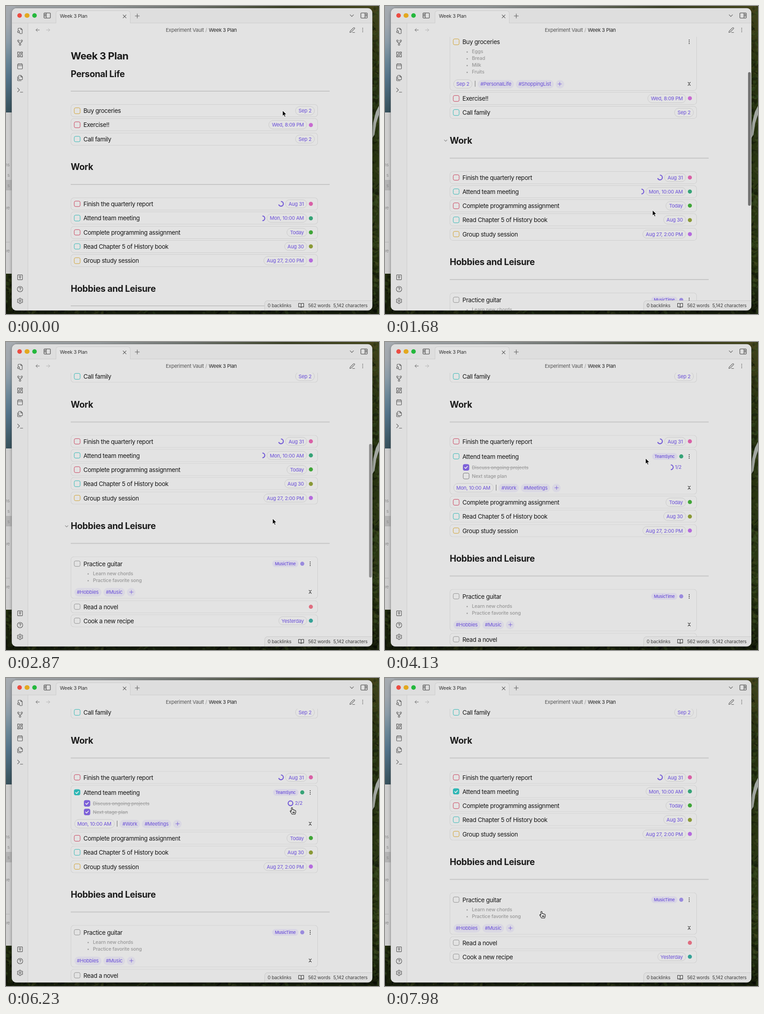
An HTML page with a canvas that plays this animation: 824x680 px, repeating every 8 s.

```html
<!DOCTYPE html>
<html lang="en">
<head>
<meta charset="utf-8">
<title>Week 3 Plan</title>
<style>
html, body { margin: 0; width: 100%; height: 100%; overflow: hidden; }
body { background: #14180d; font: 11px/1 Inter, sans-serif; letter-spacing: -.022em; color: #1b1b1b; }
#stage { position: relative; width: 824px; height: 680px; overflow: hidden; }
#stage *, #stage { box-sizing: border-box; }
.abs, .icon, .t { position: absolute; }
.t { transform: translateY(-50%); white-space: pre; line-height: 16px; }
.icon { transform: translate(-50%, -50%); }
svg { display: block; overflow: visible; fill: none; stroke: #5a5a5a; stroke-width: 1.9; stroke-linecap: round; stroke-linejoin: round; }

#scene { left: 0; top: 0; }
.behind { left: 0; top: 235px; width: 20px; height: 356px; background: #cecece; color: #8d8d8d; font-size: 10px; }
.behind i { left: 0; top: 149px; width: 20px; height: 23px; background: #b4b4b4; }

#win { left: 13px; top: 5px; width: 796px; height: 667px; border-radius: 10px; background: #e3e3e3; box-shadow: 0 0 0 .5px #8c8c8c, 0 2px 7px #0005; overflow: hidden; }
#win > div { left: -13px; top: -5px; width: 824px; height: 680px; }
.bar { left: 13px; top: 5px; width: 796px; height: 33px; background: #dedede; border-bottom: 1px solid #cdcdcd; }
.side { left: 13px; top: 38px; width: 36px; height: 634px; background: #dfdfdf; border-right: 1px solid #cdcdcd; }
.tab { left: 110px; top: 10px; width: 165px; height: 28px; background: #e3e3e3; border: 1px solid #cdcdcd; border-bottom: 0; border-radius: 6px 6px 0 0; }
.light { width: 10.4px; height: 10.4px; border-radius: 50%; top: 16px; }

#view { left: 49px; top: 68px; width: 760px; height: 604px; overflow: hidden; }
#doc { left: 94px; top: 0; width: 572px; padding-top: 34px; }
h1, h2 { margin: 0; white-space: nowrap; }
h1 { position: absolute; top: 21.5px; font-size: 22.2px; line-height: 40px; letter-spacing: -.024em; }
h2 { position: relative; padding-top: 27.6px; height: 87.2px; font-size: 19.5px; line-height: 40px; font-weight: 650; letter-spacing: -.017em; border-bottom: 2px solid #c6c6c6; margin-bottom: 28px; }
h2 .icon { left: -9px; top: 48px; opacity: 0; }
.card { --e: 0; position: relative; width: 546px; height: calc(28px + var(--e) * var(--g)); margin-bottom: 3.3px; border-radius: 7px; box-shadow: inset 0 0 0 1px #cfcfcf; overflow: hidden; }
.card:last-child { margin-bottom: 0; }
.head { left: 0; right: 0; top: calc(14px + 1.9px * var(--e)); height: 0; }
.title { left: 28px; font-size: 13.35px; letter-spacing: -.027em; color: #161616; line-height: 20px; }
.box { position: absolute; width: 13.5px; height: 13.5px; border: 1.2px solid var(--c); border-radius: 3.5px; transform: translate(-50%, -50%); }
.box svg { position: absolute; left: -1.2px; top: -1.2px; width: 13.5px; height: 13.5px; stroke: #ececec; stroke-width: 3; opacity: var(--on, 0); background: var(--c); border-radius: 3.5px; }
.row { position: absolute; display: flex; align-items: center; gap: 4px; transform: translateY(-50%); white-space: nowrap; color: #6a4fd8; }
.closed { opacity: calc(1 - var(--e)); }
.open { opacity: var(--e); }
.pill, .tag { height: 19.5px; line-height: 18px; border-radius: 10px; padding: 0 6px; border: 1px solid #c9c9c9; }
.tag { border-color: transparent; background: #dad8e3; padding: 0 5px; height: 19px; line-height: 17px; }
.plus { width: 19px; padding: 0; display: grid; place-items: center; }
.proj { height: 15px; line-height: 15px; border-radius: 8px; padding: 0 5.5px; background: #d9d6e5; font-size: 9.3px; font-weight: 500; }
.dot { width: 9px; height: 9px; border-radius: 50%; }
.ring { width: 13px; height: 13px; stroke: #7259d6; stroke-width: 2.2; stroke-linecap: butt; transform: rotate(-90deg); margin-right: -1px; flex: none; }
.sep { color: #555; }
.note { left: 49px; font-size: 10.6px; font-weight: 450; letter-spacing: -.012em; color: #979797; }
.note.bullet::before { content: ""; position: absolute; left: -12px; top: 7px; width: 3px; height: 3px; border-radius: 50%; background: #a0a0a0; }
.done { text-decoration: line-through; color: #a3a3a3; }

#thumb { left: 802px; width: 5.5px; height: 295px; border-radius: 3px; background: #757575; }
.status { left: 571px; top: 650px; width: 238px; height: 22px; background: #dfdfdf; border: 1px solid #cbcbcb; border-width: 1px 0 0 1px; border-radius: 7px 0 0; }
.st { font-size: 10.2px; letter-spacing: -.02em; color: #3f3f3f; }
#press { width: 34px; height: 34px; margin: -17px 0 0 -17px; border-radius: 50%; border: 2px solid #a6a6a6; background: #ededed66; left: 0; top: 0; }
#cursor { left: 0; top: 0; }
#cursor svg { position: absolute; stroke: #fff; stroke-width: 1; fill: #000; transform: scale(.88); transform-origin: 0 0; }
#cursor .hand { fill: #f4f4f4; stroke: #111; stroke-width: 1.1; transform: none; }
</style>
</head>
<body>
<div id="stage">
  <canvas class="abs" id="scene" width="824" height="680"></canvas>
  <div class="abs behind" id="behind"><i class="abs"></i></div>
  <div class="abs" id="win"><div class="abs" id="ui">
    <div class="abs bar"></div><div class="abs side"></div><div class="abs tab"></div>
    <div class="abs" id="view"><div class="abs" id="doc"><h1>Week 3 Plan</h1></div></div>
    <div class="abs" id="thumb"></div>
    <div class="abs status"></div>
  </div></div>
  <div class="abs" id="press"></div>
  <div class="abs" id="cursor">
    <svg class="arrow" width="12" height="18"><path d="M0 0V13.6L3.1 10.8 5.2 15.8 7.6 14.8 5.5 9.9H9.8Z"/></svg>
    <svg class="hand" width="14" height="16"><path d="M-1.6 6.5V.6C-1.6-1.2 1-1.2 1 .6V4.4C1.6 3.6 3.4 3.8 3.5 5 4.2 4.3 5.8 4.6 5.9 5.7 6.8 5.2 8.1 5.7 8.1 7V9.4C8.1 11.4 7 12 6.8 14H-.3C-.6 12.4-3.3 9.6-4.2 7.6-4.6 6.4-3.1 5.6-2.3 6.9L-1.6 8M1.6 8.6V11.4M3.4 8.6V11.4M5.2 8.6V11.4"/></svg>
  </div>
</div>
<script>
const $ = s => document.querySelector(s);
const add = (el, html) => el.insertAdjacentHTML('beforeend', html);
const svg = (d, size, extra = '') => `<svg viewBox="0 0 24 24" width="${size}" height="${size}" style="${extra}"><path d="${d}"/></svg>`;
const icon = (x, y, d, size = 14.5, extra) => `<span class="icon" style="left:${x}px;top:${y}px">${svg(d, size, extra)}</span>`;
const text = (x, y, s, cls = '', css = '') => `<span class="t ${cls}" style="left:${x}px;top:${y}px;${css}">${s}</span>`;

// wooded wallpaper that shows around the window
function paintScene() {
  const g = $('#scene').getContext('2d');
  let seed = 7;
  const rnd = () => (seed = seed * 16807 % 2147483647) / 2147483647;
  const fade = (x0, y0, x1, y1, stops) => {
    const f = g.createLinearGradient(x0, y0, x1, y1);
    stops.forEach((c, i) => f.addColorStop(i / (stops.length - 1), c));
    return f;
  };
  const leaves = (n, x, y, w, h, dark) => {
    for (let i = 0; i < n; i++) {
      g.fillStyle = `hsl(${68 + 26 * rnd()} 40% ${dark + 17 * rnd()}% / .6)`;
      g.beginPath();
      g.ellipse(x + w * rnd(), y + h * rnd(), 1 + 2.5 * rnd(), 2 + 5 * rnd(), rnd() * 3, 0, 7);
      g.fill();
    }
  };
  g.fillStyle = fade(0, 0, 0, 680, ['#45441c', '#28320f', '#26310f', '#2b3812', '#27340f', '#141b0a']);
  g.fillRect(0, 0, 824, 680);
  leaves(420, 806, 0, 18, 640, 6);
  leaves(40, 806, 640, 18, 40, 2);
  leaves(180, 0, 668, 824, 12, 1);
  leaves(40, 0, 588, 15, 92, 2);
  g.fillStyle = '#a3a8a2';
  g.fill(new Path2D('M824 220 817 234 811 258 809 292 814 284 818 258 824 240Z'));
  g.fillStyle = fade(0, 0, 824, 0, ['#a2a7ab', '#94999b', '#6c716c', '#3a4023', '#454619']);
  g.fillRect(0, 0, 806, 8);
  g.fillStyle = fade(0, 0, 0, 236, ['#a6abb0', '#a0a7ae', '#8b9ca8', '#6c8898', '#54748a', '#456272', '#36505a']);
  g.fillRect(0, 0, 20, 236);
}
paintScene();

const P = {
  x: 'M5 5 19 19M19 5 5 19', plus: 'M12 4V20M4 12H20', down: 'M5 9 12 16 19 9', tick: 'M6.5 12.5 10.5 16.5 17.5 8.5',
  dots: 'M12 5V5.1M12 12V12.1M12 19V19.1', fold: 'M6 4 12 10 18 4M6 20 12 14 18 20',
  back: 'M20 12H4M11 5 4 12 11 19', next: 'M4 12H20M13 5 20 12 13 19',
  left: 'M4 4H20Q22 4 22 6V18Q22 20 20 20H4Q2 20 2 18V6Q2 4 4 4ZM9 4V20M4.5 8H6.5M4.5 11H6.5M4.5 14H6.5',
  right: 'M4 4H20Q22 4 22 6V18Q22 20 20 20H4Q2 20 2 18V6Q2 4 4 4ZM15 4V20M17.5 8H19.5M17.5 11H19.5M17.5 14H19.5',
  pen: 'M17 3A2.8 2.8 0 0 1 21 7L7.5 20.5 2 22 3.5 16.5ZM13 22H22',
  book: 'M2 4H8A4 4 0 0 1 12 8V21A3 3 0 0 0 9 18H2ZM22 4H16A4 4 0 0 0 12 8V21A3 3 0 0 1 15 18H22Z'
};
const rail = [
  [54.5, 'M5 9V4Q5 2 7 2H15L20 7V20Q20 22 18 22H12M15 2V7H20M10 15A3.5 3.5 0 1 0 3 15 3.5 3.5 0 1 0 10 15M9 18 12 21'],
  [80.5, 'M9 5A3 3 0 1 0 3 5 3 3 0 1 0 9 5M21 5A3 3 0 1 0 15 5 3 3 0 1 0 21 5M15 19A3 3 0 1 0 9 19 3 3 0 1 0 15 19M6 8V10Q6 12 8 12H16Q18 12 18 10V8M12 12V16'],
  [107, 'M3 3H10V12H3ZM14 3H21V8H14ZM14 12H21V21H14ZM3 16H10V21H3Z'],
  [133, 'M5 4H19Q21 4 21 6V20Q21 22 19 22H5Q3 22 3 20V6Q3 4 5 4ZM16 2V6M8 2V6M3 10H21'],
  [159, 'M15 2H9Q7 2 7 4V16Q7 18 9 18H19Q21 18 21 16V8ZM15 2V8H21M3 7V20Q3 22 5 22H16'],
  [185.5, 'M3 18 10 11 3 4M13 19H22'],
  [599, 'M5 3H19Q21 3 21 5V19Q21 21 19 21H5Q3 21 3 19V5Q3 3 5 3ZM15 10A3 3 0 1 0 9 10 3 3 0 1 0 15 10M12 13V17'],
  [625, 'M22 12A10 10 0 1 0 2 12 10 10 0 1 0 22 12M9 9A3 3 0 0 1 15 10C15 12 12 12.5 12 14M12 17.5V17.6'],
  [651, 'M15 12A3 3 0 1 0 9 12 3 3 0 1 0 15 12M10 2H14L14.7 5 17 6.3 20 5.4 22 8.8 19.8 11V13L22 15.2 20 18.6 17 17.7 14.7 19 14 22H10L9.3 19 7 17.7 4 18.6 2 15.2 4.2 13V11L2 8.8 4 5.4 7 6.3 9.3 5Z']
];

add($('#ui'), [
  ...[[30, '#ec4c42'], [46.5, '#e3a81f'], [63, '#24b83c']].map(([x, c]) => `<i class="abs light" style="left:${x - 5.2}px;background:${c}"></i>`),
  ...rail.map(([y, d]) => icon(31, y, d)),
  icon(90.5, 21, P.left, 17), icon(790.5, 21, P.right, 17), icon(290, 22, P.plus, 14), icon(261.5, 23, P.x, 11.5, 'stroke-width:2.4'),
  icon(764, 21, P.down, 13), icon(70, 53, P.back, 11.5), icon(93, 53, P.next, 11.5, 'stroke:#adadad'),
  icon(765, 53, P.pen, 13), icon(788, 53, P.dots, 13, 'stroke-width:3.4'), icon(652, 661, P.book, 13.5, 'stroke:#333'),
  text(119, 23, 'Week 3 Plan', '', 'font-size:10.8px;color:#333'),
  text(353, 53, 'Experiment Vault', '', 'color:#555'), text(440.5, 53, '/', '', 'color:#999'), text(448, 53, 'Week 3 Plan', '', 'color:#222'),
  text(578, 661, '0 backlinks', 'st'), text(667.5, 661, '562 words', 'st'), text(723, 661, '5,142 characters', 'st')
].join(''));
add($('#behind'), [['ns', 115], ['s', 138], ['s', 161], ['ve', 210], ['c…', 283], ['ve', 305]]
  .map(([s, y]) => `<span class="t" style="right:12px;top:${y}px">${s}</span>`).join(''));

const gold = '#d0a02c', red = '#c93c58', teal = '#2fb7b5', gray = '#909090', violet = '#7d60d8';
const ring = part => `<svg class="ring" viewBox="0 0 13 13"><circle cx="6.5" cy="6.5" r="5.2" pathLength="100" stroke-dasharray="${part} 100"/></svg>`;
const dot = c => c ? `<i class="dot" style="background:${c}"></i>` : '';
const box = (x, y, c, cls = '') => `<span class="box ${cls}" style="left:${x}px;top:${y}px;--c:${c}">${svg(P.tick, 13.5)}</span>`;

const sections = [
  ['Personal Life', [
    { id: 'buy', title: 'Buy groceries', c: gold, date: 'Sep 2', grow: 95.6, notes: ['Eggs', 'Bread', 'Milk', 'Fruits'], tags: ['PersonalLife', 'ShoppingList'] },
    { title: 'Exercise!!', c: red, date: 'Wed, 8:09 PM', dot: '#c86bd0' },
    { title: 'Call family', c: teal, date: 'Sep 2' }]],
  ['Work', [
    { title: 'Finish the quarterly report', c: red, date: 'Aug 31', dot: '#d960a6', part: 70 },
    { id: 'meet', title: 'Attend team meeting', c: teal, date: 'Mon, 10:00 AM', dot: '#36a377', part: 50, grow: 72, proj: 'TeamSync', tasks: ['Discuss ongoing projects', 'Next stage plan'], tags: ['Work', 'Meetings'] },
    { title: 'Complete programming assignment', c: red, date: 'Today', dot: '#40a538' },
    { title: 'Read Chapter 5 of History book', c: teal, date: 'Aug 30', dot: '#8a9936' },
    { title: 'Group study session', c: gold, date: 'Aug 27, 2:00 PM', dot: '#b56bdd' }]],
  ['Hobbies and Leisure', [
    { id: 'guitar', title: 'Practice guitar', c: gray, dot: '#9a8bdd', grow: 65.4, proj: 'MusicTime', notes: ['Learn new chords', 'Practice favorite song'], tags: ['Hobbies', 'Music'] },
    { title: 'Read a novel', c: gray, dot: '#df6d80' },
    { title: 'Cook a new recipe', c: gray, date: 'Yesterday', dot: '#35a297' }]]
];

function details(k) {
  const date = k.date ? `<span class="pill">${k.date}</span><span class="sep">|</span>` : '';
  const tags = k.tags.map(s => `<span class="tag">#${s}</span>`).join('');
  return `<div class="open">
    <div class="row" style="right:30.5px;top:15.9px">${k.proj ? `<span class="proj">${k.proj}</span>` + dot(k.dot) : ''}</div>
    ${icon(529, 15.9, P.dots, 13, 'stroke:#222;stroke-width:3.6')}
    ${(k.notes || []).map((s, i) => text(49, 38.3 + 15 * i, s, 'note bullet')).join('')}
    ${(k.tasks || []).map((s, i) => box(36, 40.6 + 18.8 * i, i ? '#777' : violet, 'sub' + i) + text(49, 41.4 + 18.6 * i, s, 'note' + (i ? ' later' : ' done'))).join('')}
    ${k.tasks ? `<div class="row" style="right:34px;top:40.6px">${ring(50)}<span class="count">1/2</span></div>` : ''}
    <div class="row" style="left:7.5px;top:${28 + k.grow - 14.5}px">${date}${tags}<span class="tag plus">${svg(P.plus, 12, 'stroke:#7259d6')}</span></div>
    ${icon(529, 28 + k.grow - 15, P.fold, 10.5, 'stroke:#222;stroke-width:2.4')}
  </div>`;
}
for (const [name, cards] of sections) {
  add($('#doc'), `<section><h2>${name}${icon(-9, 48, P.down, 10.5, 'stroke:#888;stroke-width:2.6')}</h2>` + cards.map(k =>
    `<div class="card" id="${k.id || ''}" style="--g:${k.grow || 0}px">
      <div class="abs head">${box(14, 0, k.c, 'main')}${text(28, 0, k.title, 'title')}
      <div class="row closed" style="right:${k.dot ? 11 : 7}px">${k.part ? ring(k.part) : ''}${k.date ? `<span class="pill">${k.date}</span>` : ''}${dot(k.dot)}</div></div>
      ${k.tags ? details(k) : ''}</div>`).join('') + '</section>');
}

const clamp = u => Math.max(0, Math.min(1, u));
const smooth = u => u * u * (3 - 2 * u);
const ramp = (t, a, b) => smooth(clamp((t - a) / (b - a)));
const within = (t, a, b) => t >= a && t < b;

// time, x, y of the pointer tip
const path = [[0, 611, 231], [70, 611, 231], [280, 611, 232], [700, 611, 232], [905, 603, 395], [1130, 603, 395], [1260, 591, 451],
  [2460, 591, 451], [2660, 589, 390], [2875, 589, 390], [3080, 594, 314], [3240, 594, 314], [3430, 592, 268], [3580, 592, 268],
  [3710, 590, 252], [4060, 590, 252], [4410, 455, 300], [4560, 228, 335], [4640, 228, 335], [4970, 177, 297],
  [5440, 177, 297], [5690, 410, 345], [5950, 632, 287], [6800, 632, 286], [7090, 692, 316], [7350, 671, 317], [7620, 671, 317], [7980, 346, 516]];
const clicks = [420, 3740, 5180, 7480];

function pointer(t) {
  const i = path.findIndex(p => p[0] > t);
  if (i < 0) return path.at(-1).slice(1);
  const [a, x, y] = path[i - 1], [b, u, v] = path[i], k = smooth((t - a) / (b - a));
  return [x + (u - x) * k, y + (v - y) * k];
}

const heads = document.querySelectorAll('h2 .icon');
const buy = $('#buy'), meet = $('#meet');
$('#guitar').style.setProperty('--e', 1);
meet.querySelector('.sub0').style.setProperty('--on', 1);
const meetRings = meet.querySelectorAll('.ring');

function draw(t) {
  buy.style.setProperty('--e', ramp(t, 440, 620));
  meet.style.setProperty('--e', ramp(t, 3800, 3990) - ramp(t, 7520, 7720));

  const scroll = 313.4 * (1 - (1 - clamp((t - 1375) / 865)) ** 1.55);
  $('#doc').style.transform = `translateY(${-scroll}px)`;
  $('#thumb').style.top = 69.3 + .4965 * scroll + 'px';
  $('#thumb').style.opacity = t < 1390 ? 0 : 1 - clamp((t - 2800) / 280);
  heads[1].style.opacity = +within(t, 1230, 2240);
  heads[2].style.opacity = +within(t, 2600, 2950);

  const ticked = t >= 5300;
  const sub = meet.querySelector('.sub1').style;
  sub.setProperty('--on', +ticked);
  sub.setProperty('--c', ticked ? violet : '#777');
  meet.querySelector('.later').classList.toggle('done', ticked);
  meet.querySelector('.main').style.setProperty('--on', ramp(t, 5400, 5620));
  meet.querySelector('.count').textContent = ticked ? '2/2' : '1/2';
  meetRings[0].style.display = ticked ? 'none' : '';
  meetRings[1].firstChild.setAttribute('stroke-dasharray', `${50 + 50 * ramp(t, 5300, 5500)} 100`);

  const [x, y] = pointer(t), at = `translate(${x}px, ${y}px)`;
  const hand = within(t, 500, 1190) || t >= 5860;
  $('#cursor').style.transform = $('#press').style.transform = at;
  $('.arrow').style.display = hand ? 'none' : '';
  $('.hand').style.display = hand ? '' : 'none';
  const since = t - clicks.findLast(c => c <= t);
  $('#press').style.opacity = since >= 0 ? 1 - ramp(since, 120, 230) : 0;
}

const start = performance.now();
(function loop() {
  draw((performance.now() - start) % 8000);
  requestAnimationFrame(loop);
})();
</script>
</body>
</html>
```
